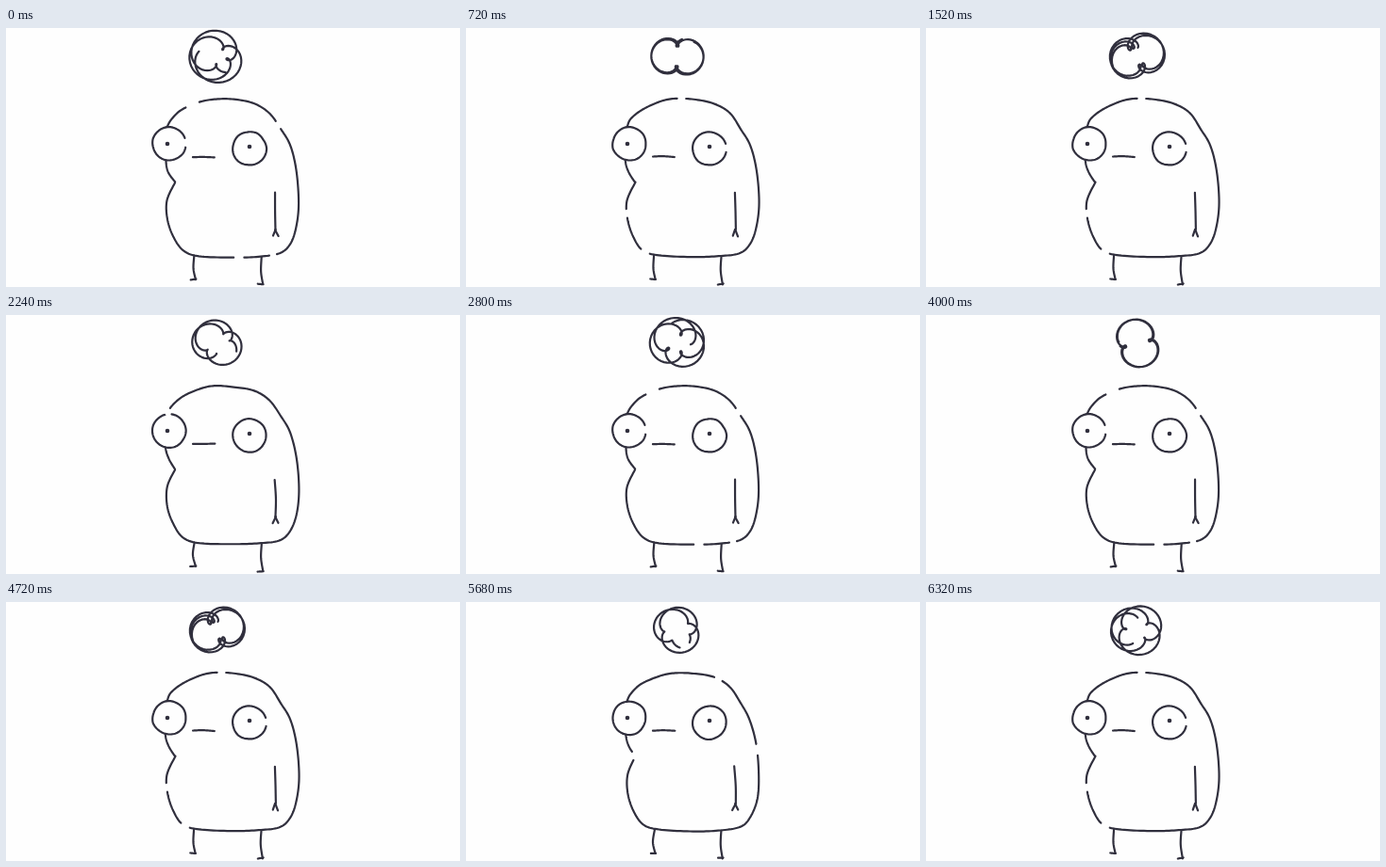
An HTML page with a canvas for the animation above (6400 ms loop, 481 px wide and 275 px high).

```html
<!DOCTYPE html>
<html>
<head>
<meta charset="utf-8">
<style>
html, body { margin: 0; width: 100%; height: 100%; overflow: hidden; background: #fefefe; }
canvas { display: block; }
</style>
</head>
<body>
<canvas id="stage" width="481" height="275"></canvas>
<script>
const ctx = document.getElementById('stage').getContext('2d');
const INK = '#302f3d', PAPER = '#fefefe';
const STEP = 80, STEPS = 80, TANGLES = 40, TAU = 2 * Math.PI;

const points = text => text.split(' ').map(p => p.split(',').map(Number));

const outline = points('171,105 175,97 186,87 204,79 220,75.5 240,76 262,80 279,90 291,107 301,125 308,152 ' +
  '310.5,185 308,210 301,229 290,239 268,242.5 240,243.5 205,242 188,236 177,222 171,203 171,183 179,164');
const cheek = points('179,164 172,153 169,140 170,122 168,111 171,105');
const mouth = points('198,137 209,136.5 221,137');
const arm = points('284.5,175 285.5,195 285.5,214');
const fingers = [points('285.5,214 282.5,221'), points('285.5,214 288.5,221')];
const legs = [points('199.5,242 198.5,255 200.5,267'), points('270.5,243 270,258 272,272')];
const lids = [points('153,123 163,127 175,128 190,123'), points('240,124 249,129 262,131 278,130')];
const eyes = [
  { x: 173, y: 123, pupil: [171, 123] },
  { x: 258, y: 128, pupil: [258, 126] }
];

// Where the pen lifts in each of the five redrawn poses.
const lifts = ['195,82 200,80 287,103 283,241 246,243 190,122', '267,82 308,156 178,163',
  '218,76 302,127 311,191 296,235', '171,103', '229,76 190,237 171,197 276,127'].map(points);

function seeded(seed) {
  let n = seed * 7919 + 17;
  return () => {
    n = (n * 16807) % 2147483647;
    return n / 2147483647;
  };
}

function splineAt(path, u) {
  const last = path.length - 1;
  const i = Math.min(Math.floor(u * last), last - 1), t = u * last - i;
  const [a, b, c, d] = [-1, 0, 1, 2].map(k => path[Math.max(0, Math.min(last, i + k))]);
  return [0, 1].map(k => b[k] + t / 2 * (c[k] - a[k] +
    t * (2 * a[k] - 5 * b[k] + 4 * c[k] - d[k] + t * (3 * (b[k] - c[k]) + d[k] - a[k]))));
}

function trace(pointAt, count, gaps = []) {
  let down = false;
  ctx.beginPath();
  for (let i = 0; i <= count; i++) {
    const [x, y] = pointAt(i / count);
    const lifted = gaps.some(g => Math.hypot(g[0] - x, g[1] - y) < 4);
    if (!lifted) ctx[down ? 'lineTo' : 'moveTo'](x, y);
    down = !lifted;
  }
  ctx.stroke();
}

function dot(x, y, r, color) {
  ctx.beginPath();
  ctx.arc(x, y, r, 0, TAU);
  ctx.fillStyle = color;
  ctx.fill();
}

function tangle(seed) {
  const random = seeded(seed + 60);
  random();
  const start = random() * TAU, phase = random() * TAU;
  const turns = 1.7 + random() * .8, ratio = 2.2 + random() * .9;
  const loop = 6 + random() * 4;
  trace(u => {
    const a = start + u * turns * TAU, b = ratio * a + phase;
    return [224 + 20 * Math.cos(a) + loop * Math.cos(b), 30 + 18 * Math.sin(a) + loop * Math.sin(b)];
  }, 160);
}

function draw(step) {
  const pose = step % lifts.length, gaps = lifts[pose];
  const random = seeded(pose + 1);
  const jitter = size => (random() - .5) * size;
  const pen = path => {
    const shaky = path.map(([x, y]) => [x + jitter(1.1), y + jitter(1.1)]);
    trace(u => splineAt(shaky, u), path.length * 10, gaps);
  };

  dot(240, 137, 300, PAPER);
  ctx.strokeStyle = INK;
  ctx.lineWidth = 2.2;
  ctx.lineCap = ctx.lineJoin = 'round';
  [outline, cheek, mouth, arm, ...fingers].forEach(pen);
  for (const leg of legs) {
    const [x, y] = leg[2];
    pen(leg);
    pen([[x + 1, y], [x - 5, y]]);
  }

  if (step >= 41 && step <= 43) lids.forEach(pen);
  else for (const { x, y, pupil } of eyes) {
    dot(x, y, 17, PAPER);
    const ring = Array.from({ length: 11 }, () => 17.7 + jitter(1));
    trace(u => {
      const a = u * TAU, k = Math.floor(u * 11), t = u * 11 - k;
      const r = ring[k % 11] * (1 - t) + ring[(k + 1) % 11] * t;
      return [x + r * Math.cos(a), y + r * Math.sin(a)];
    }, 88, gaps);
    dot(...pupil, 2.3, INK);
  }
  tangle(step % TANGLES);
}

function tick() {
  draw(Math.floor(performance.now() / STEP) % STEPS);
  requestAnimationFrame(tick);
}
tick();
</script>
</body>
</html>
```
